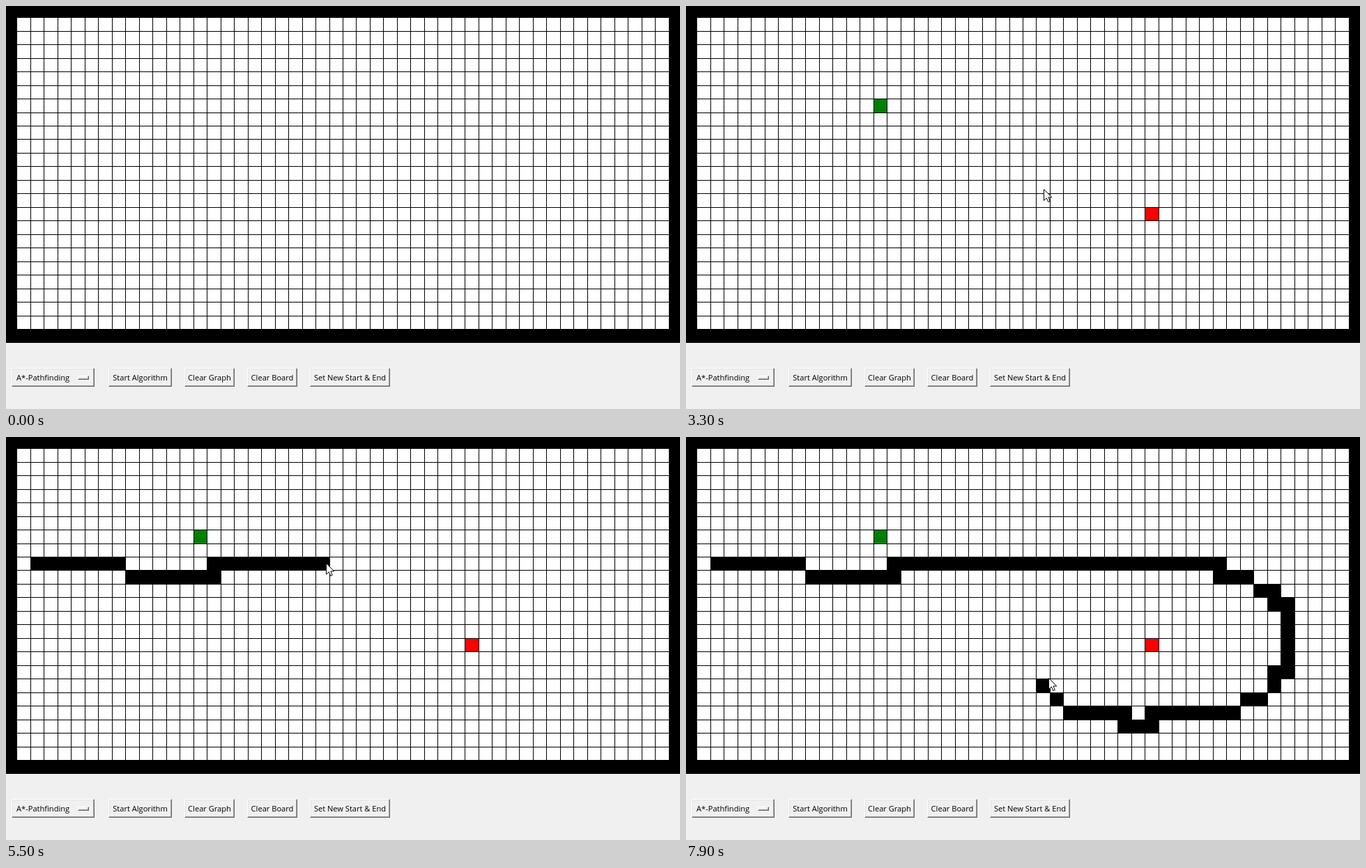
An HTML page with a canvas for the animation above (8000 ms loop, 967 by 579 pixels).

```html
<!DOCTYPE html>
<html lang="en">
<head>
<meta charset="utf-8">
<title>Pathfinding board</title>
<style>
  html, body { margin: 0; width: 100%; height: 100%; overflow: hidden; background: #f0f0f0; }
  canvas { display: block; }
  .button {
    position: absolute; top: 520px; height: 27px; box-sizing: border-box;
    display: flex; align-items: center; justify-content: center;
    border: 1px solid; border-color: #fff #696969 #696969 #fff;
    box-shadow: inset -1px -1px #a0a0a0, inset 1px 1px #e3e3e3;
    font: 11.1px "Open Sans", "Noto Sans", sans-serif; color: #000; white-space: nowrap;
  }
  .menu { justify-content: flex-start; padding-left: 6px; }
  .menu::after {
    content: ""; position: absolute; left: 94px; top: 10px; width: 14px; height: 4px;
    border: 1px solid; border-color: #fff #696969 #696969 #fff;
    box-shadow: inset -1px -1px #a0a0a0;
  }
</style>
</head>
<body>
<canvas id="board" width="967" height="484"></canvas>
<div class="button menu" style="left:8px;width:119px">A*-Pathfinding</div>
<div class="button" style="left:147px;width:91px">Start Algorithm</div>
<div class="button" style="left:256px;width:72px">Clear Graph</div>
<div class="button" style="left:346px;width:72px">Clear Board</div>
<div class="button" style="left:436px;width:115px">Set New Start &amp; End</div>
<script>
const ctx = document.getElementById('board').getContext('2d');
const LOOP = 8000, STEP = 100;
const COLS = 48, ROWS = 23, PITCH = 19.48, LEFT = 15.47, TOP = 16.15;
const APPEAR = 200, SET_START = 1100, SET_END = 2700, PRESS = 4300, MOUSE_STEP = 25;

// Key points of the pointer: time, x, y
const hover = [
  [APPEAR, 769, 110], [500, 460, 135], [900, 276, 140], [1300, 275, 140], [2100, 600, 269],
  [2300, 630, 282], [SET_END, 668, 305], [3100, 620, 295], [3500, 405, 230], [4000, 67, 178],
  [4100, 36, 177], [PRESS, 43, 178]
];
const drag = [
  [4400, 43, 178], [4740, 176, 192], [5030, 290, 192], [5500, 459, 181], [6200, 701, 182],
  [6380, 762, 190], [6530, 814, 211], [6680, 858, 240], [6870, 863, 312], [7000, 846, 353],
  [7100, 810, 381], [7200, 768, 392], [7450, 665, 406.2], [7540, 628, 406], [7720, 550, 390],
  [7850, 512, 358], [7900, 520, 346]
];
const path = [...hover, ...drag];

function pointerAt(t) {
  const i = Math.max(1, path.findIndex(key => key[0] >= t));
  const [t0, x0, y0] = path[i - 1], [t1, x1, y1] = path[i];
  const u = (t - t0) / (t1 - t0);
  return [x0 + (x1 - x0) * u, y0 + (y1 - y0) * u];
}

function fillCell(col, row, color) {
  const x = Math.round(LEFT + col * PITCH) + 1, y = Math.round(TOP + row * PITCH) + 1;
  const right = Math.round(LEFT + (col + 1) * PITCH), bottom = Math.round(TOP + (row + 1) * PITCH);
  ctx.fillStyle = color;
  ctx.fillRect(x, y, right - x, bottom - y);
}

// Dragging blackens every cell a mouse sample falls in, with its border lines
function drawWall(t) {
  ctx.fillStyle = '#000';
  for (let s = PRESS; s < t; s += MOUSE_STEP) {
    const [x, y] = pointerAt(s);
    fillCell(Math.floor((x - LEFT) / PITCH), Math.floor((y - TOP) / PITCH), '#000');
  }
}

const arrow = new Path2D('M.5 .5V16.5L4.3 12.9L6.8 18.5L9.3 17.5L6.9 11.9H11.8Z');
function drawPointer(t) {
  const [x, y] = pointerAt(t);
  ctx.save();
  ctx.translate(Math.round(x), Math.round(y));
  ctx.fillStyle = '#fff';
  ctx.strokeStyle = '#000';
  ctx.fill(arrow);
  ctx.stroke(arrow);
  ctx.restore();
}

function draw() {
  const t = Math.floor(performance.now() % LOOP / STEP) * STEP;
  ctx.fillStyle = '#000';
  ctx.fillRect(0, 0, 967, 484);
  for (let col = 0; col < COLS; col++)
    for (let row = 0; row < ROWS; row++) fillCell(col, row, '#fff');
  if (t >= SET_START) fillCell(13, 6, 'green');
  if (t >= SET_END) fillCell(33, 14, 'red');
  drawWall(t);
  if (t >= APPEAR) drawPointer(t);
  requestAnimationFrame(draw);
}
draw();
</script>
</body>
</html>
```
